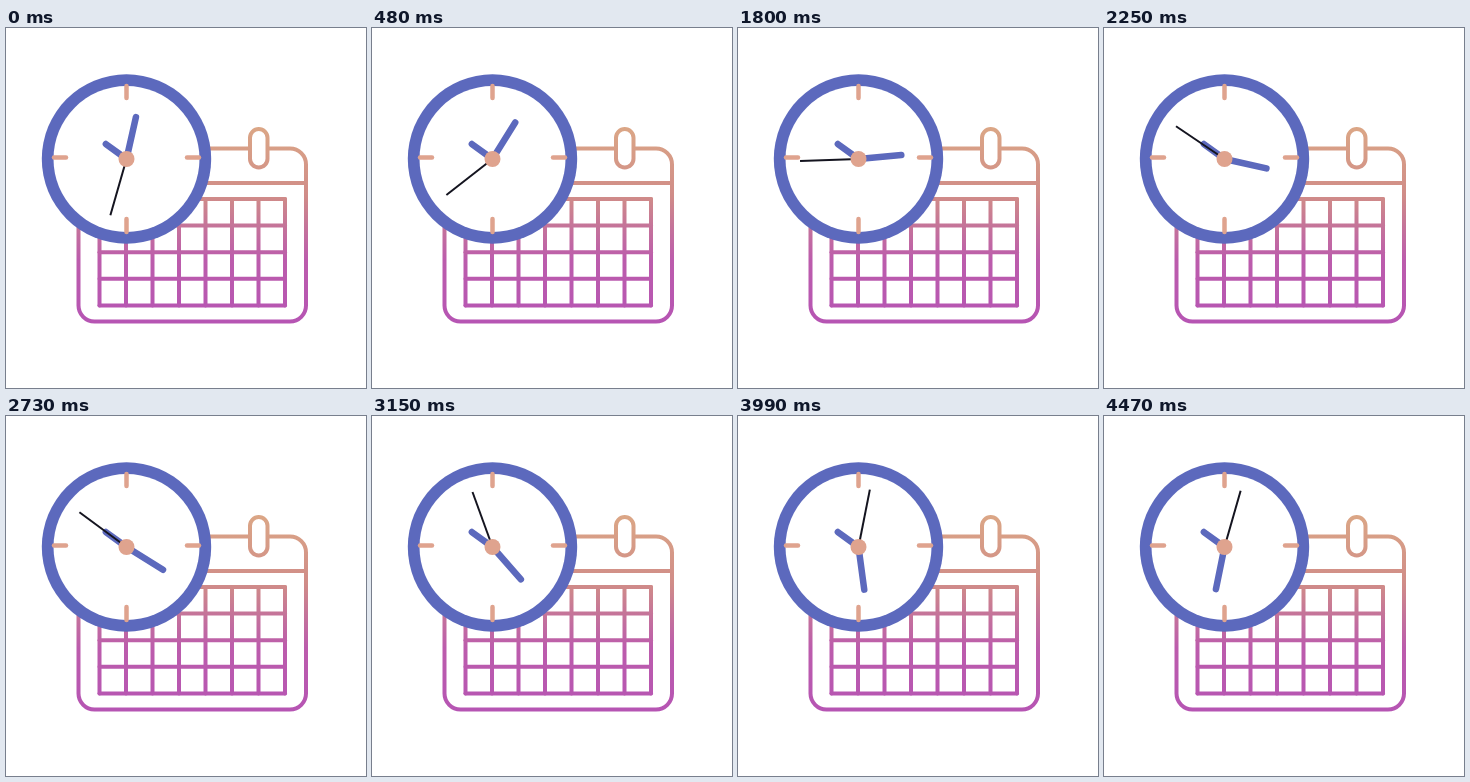
Write an HTML page with a canvas that moves like this. It is 360 by 360 pixels and loops after 4500 ms.

```html
<!DOCTYPE html>
<html lang="en">
<head>
<meta charset="utf-8">
<title>Clock and calendar</title>
<style>
  html, body { margin: 0; width: 100%; height: 100%; overflow: hidden; background: #fff; }
  canvas { display: block; width: 360px; height: 360px; }
</style>
</head>
<body>
<canvas id="stage" width="360" height="360"></canvas>
<script>
const ctx = document.getElementById('stage').getContext('2d');
const LOOP = 4500, STEP = 30, TICK = 900, SWEEP = 450;
const CX = 120.5, CY = 131;
const BLUE = '#5c69bd', PEACH = '#dfa38e', INK = '#14141f';

const warm = ctx.createLinearGradient(0, 100, 0, 294);
warm.addColorStop(0, '#dba686');
warm.addColorStop(0.35, '#d08c88');
warm.addColorStop(0.52, '#c4729b');
warm.addColorStop(0.68, '#bc5cac');
warm.addColorStop(1, '#b655b3');

function line(x1, y1, x2, y2, color, width, cap = 'round') {
  ctx.beginPath();
  ctx.moveTo(x1, y1);
  ctx.lineTo(x2, y2);
  ctx.strokeStyle = color;
  ctx.lineWidth = width;
  ctx.lineCap = cap;
  ctx.stroke();
}

function box(x, y, w, h, r) {
  ctx.beginPath();
  ctx.roundRect(x, y, w, h, r);
  ctx.fillStyle = '#fff';
  ctx.fill();
  ctx.strokeStyle = warm;
  ctx.lineWidth = 4;
  ctx.stroke();
}

function disc(r, color) {
  ctx.beginPath();
  ctx.arc(CX, CY, r, 0, Math.PI * 2);
  ctx.fillStyle = color;
  ctx.fill();
}

// Angles run clockwise from twelve o'clock, in degrees.
function hand(degrees, length, color, width, cap) {
  const a = degrees * Math.PI / 180;
  line(CX, CY, CX + length * Math.sin(a), CY - length * Math.cos(a), color, width, cap);
}

function drawCalendar() {
  box(72.5, 120.5, 227.5, 173, 16);
  line(74, 155, 299, 155, warm, 4, 'butt');
  box(244, 101, 17.5, 38.5, 8.75);
  for (let i = 0; i < 8; i++) {
    const x = 93.5 + i * 26.5;
    line(x, 171, x, 277.5, warm, 4);
  }
  for (let j = 0; j < 5; j++) {
    const y = 171 + j * 26.6;
    line(93.5, y, 279, y, warm, 4);
  }
}

function drawClock(t) {
  disc(84.7, BLUE);
  disc(73, '#fff');
  line(120.5, 58, 120.5, 70, PEACH, 4.5);
  line(120.5, 191, 120.5, 204, PEACH, 4.5);
  line(48, 129.5, 60, 129.5, PEACH, 4.5);
  line(181, 129.5, 193, 129.5, PEACH, 4.5);

  // The second hand sweeps for half of every tick, then rests.
  const ticks = Math.floor(t / TICK) + Math.min(1, (t % TICK) / SWEEP);
  hand(-54, 25.5, BLUE, 6.5);
  hand(12.7 + 180 * t / LOOP, 43, BLUE, 6.5);
  hand(196 + 36 * ticks, 58.5, INK, 2, 'butt');
  disc(8, PEACH);
}

function draw(now) {
  const t = Math.floor((now % LOOP) / STEP) * STEP;
  ctx.fillStyle = '#fff';
  ctx.fillRect(0, 0, 360, 360);
  drawCalendar();
  drawClock(t);
  requestAnimationFrame(draw);
}

draw(0);
</script>
</body>
</html>
```
